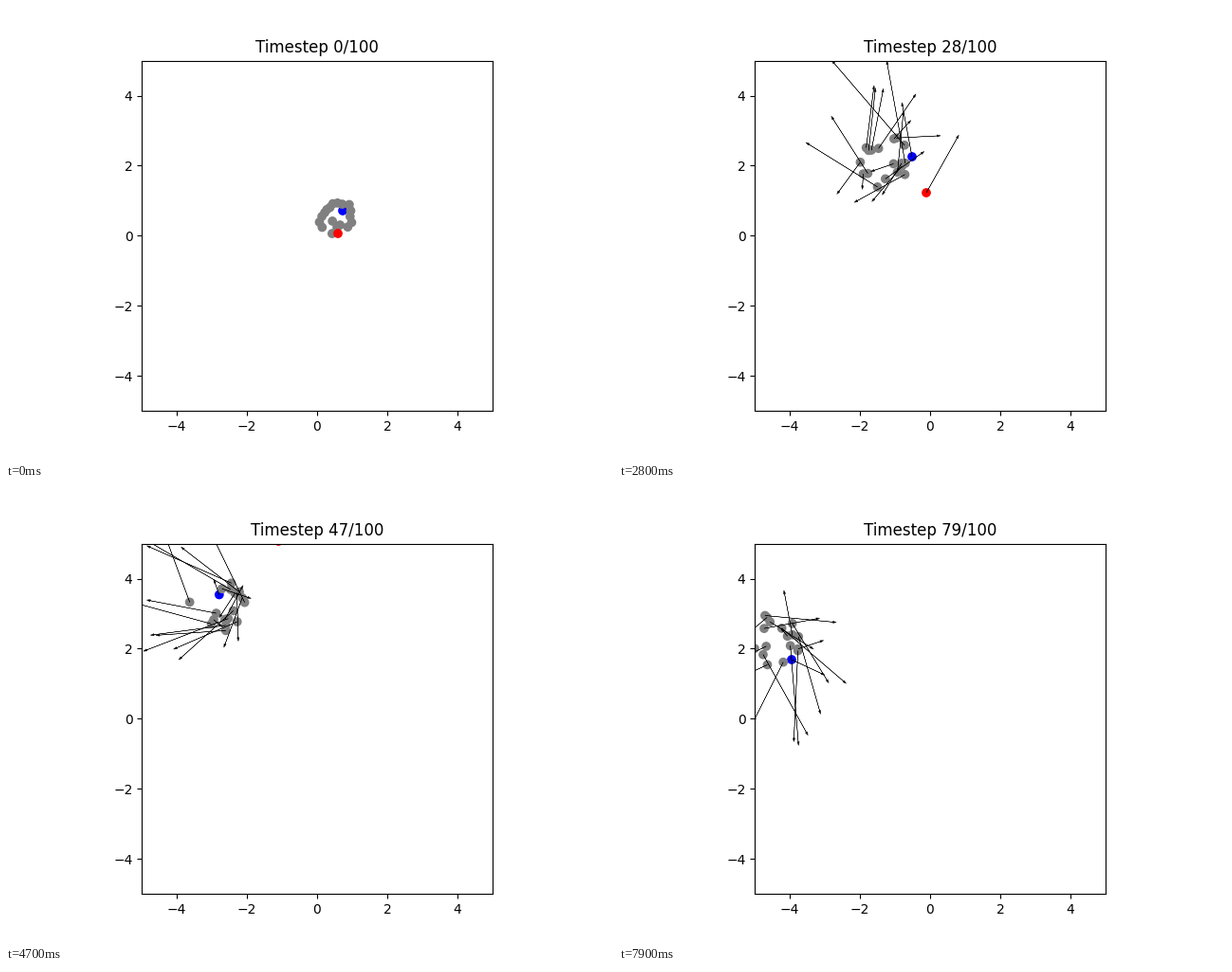
Animation of 640 by 480 pixels, one loop 8 s. Source, as a matplotlib script:

```python
import numpy as np
import matplotlib.pyplot as plt
from matplotlib.animation import FuncAnimation

STEPS, DT, N = 80, 0.1, 18
UNIT = 36.96                      # pixels per data unit
CENTER = np.array([328, 242.4])   # stage position of the data origin
rng = np.random.default_rng(7)

# Key points in stage pixels, shared key times in seconds
TIMES = np.array([0, 1.4, 2.0, 2.8, 3.9, 5.6, 6.8, 7.9, 8.6])
FLOCK = [(347, 222), (300, 198), (291, 186), (281, 166), (250, 133),
         (195, 121), (170, 130), (163, 162), (178, 190)]
BLUE = [(355, 216), (310, 225), (288, 213), (309, 159), (240, 126),
        (212, 109), (148, 136), (182, 180), (200, 172)]
RED = [(350, 240), (290, 185), (281, 228), (324, 197), (320, 115),
       (235, 20), (165, 84), (115, 150), (100, 190)]


def smooth_path(points, t):
    """Cubic path through the key points, starting at rest."""
    p = np.array(points, float)
    v = np.gradient(p, TIMES, axis=0)
    v[0] = 0
    k = np.searchsorted(TIMES, t, side="right") - 1
    h = (TIMES[k + 1] - TIMES[k])[:, None]
    s = (t - TIMES[k])[:, None] / h
    return ((2*s**3 - 3*s**2 + 1) * p[k] + (s**3 - 2*s**2 + s) * h * v[k]
            + (3*s**2 - 2*s**3) * p[k + 1] + (s**3 - s**2) * h * v[k + 1])


def swirl(t):
    """Each bird circles the flock center at its own radius and speed."""
    radius = 30 * np.sqrt(rng.uniform(0.08, 1, N))
    speed = rng.uniform(35, 85, N) * rng.choice([-1, 1], N)
    phase = 2 * np.pi * np.arange(N) / N
    t = t[:, None]
    eased = t - 0.3 * (1 - np.exp(-t / 0.3))
    angle = phase + speed / radius * eased
    r = radius * (1 - 0.35 * np.exp(-eased))
    return np.stack([r * np.cos(angle), r * np.sin(angle)], axis=-1)


t = np.arange(STEPS) * DT
flock = smooth_path(FLOCK, t)[:, None] + swirl(t)
pos = np.concatenate([smooth_path(BLUE, t)[:, None], flock,
                      smooth_path(RED, t)[:, None]], axis=1)
pos = (pos - CENTER) / UNIT * (1, -1)
vel = np.gradient(pos, DT, axis=0)
vel[0] = 0

fig, ax = plt.subplots(figsize=(6.4, 4.8), dpi=100)
ax.set(xlim=(-5, 5), ylim=(-5, 5), aspect="equal",
       xticks=range(-4, 5, 2), yticks=range(-4, 5, 2))
title = ax.set_title("")
birds = ax.scatter(*pos[0].T, c=["blue"] + ["gray"] * N + ["red"])
arrows = [ax.arrow(x, y, 1, 1, head_width=0.06, head_length=0.1,
                   color="black", lw=0.3) for x, y in pos[0]]


def update(i):
    birds.set_offsets(pos[i])
    for arrow, (x, y), (dx, dy) in zip(arrows, pos[i], vel[i]):
        arrow.set_visible(np.hypot(dx, dy) > 0.01)
        arrow.set_data(x=x, y=y, dx=dx, dy=dy)
    title.set_text(f"Timestep {i}/100")
    return [birds, title, *arrows]


anim = FuncAnimation(fig, update, frames=STEPS, interval=100,
                     repeat=True, repeat_delay=0)
plt.show()
```
